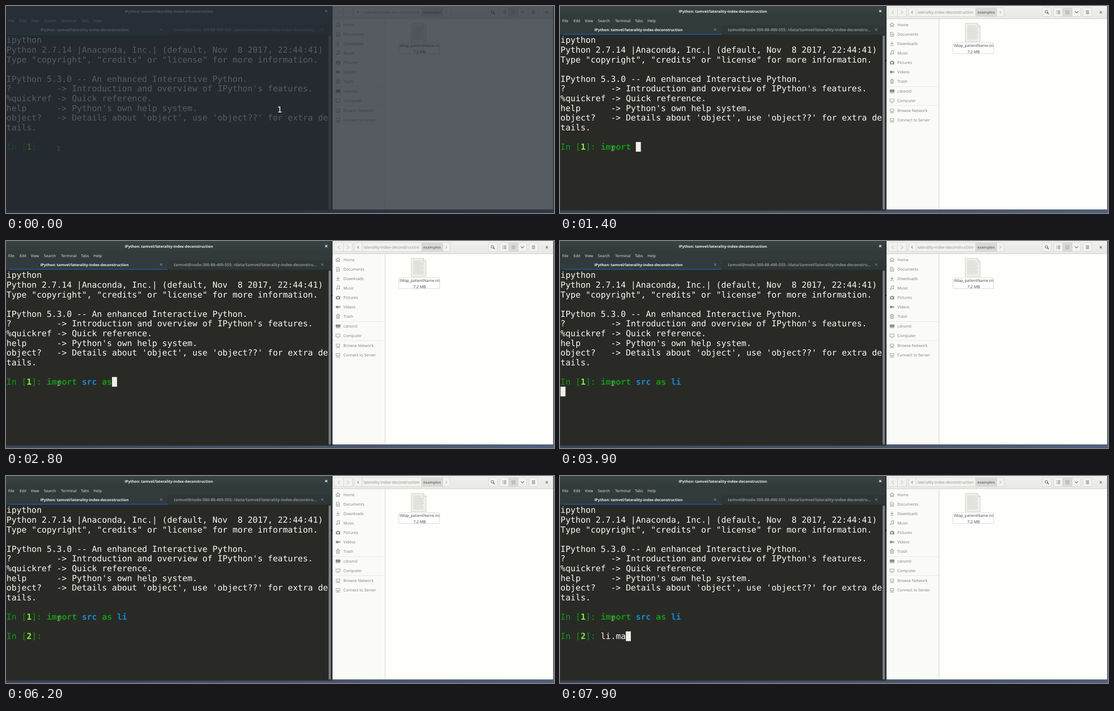
These frames come from a looping animation (1215x461 px, 8 s). An HTML page:

```html
<!DOCTYPE html>
<html lang="en">
<head>
<meta charset="utf-8">
<title>IPython session</title>
<style>
  html, body { margin: 0; width: 100%; height: 100%; overflow: hidden; background: #3d4858; }
  svg { display: block; width: 1215px; height: 461px; }
  text { white-space: pre; text-rendering: geometricPrecision; }
  .ui { font: 8.7px "Open Sans", sans-serif; fill: #7b7d79; }
  .menu { font-size: 8.5px; fill: #e4e6e2; }
  .bold { font-weight: 700; font-size: 8.2px; }
  .mid { text-anchor: middle; }
  .pale { fill: #f1f2ee; }
  .dark { fill: #3c4144; }
  .term { font: 18.5px "DejaVu Sans Mono", monospace; fill: #f8f8f2; }
  .green { fill: #149714; }
  .kw { fill: #149714; font-weight: 700; }
  .num { fill: #83f13c; font-weight: 700; }
  .mod { fill: #1785d0; font-weight: 700; }
  .icon { fill: none; stroke: #989a95; stroke-width: 1.1; }
  .solid { fill: #8d8f8a; stroke: none; }
  .btn { fill: #f2f2ef; stroke: #d6d6d1; }
</style>
</head>
<body>
<svg viewBox="0 0 1215 461" xmlns="http://www.w3.org/2000/svg">
  <defs>
    <linearGradient id="desk">
      <stop stop-color="#3b4554"/><stop offset="1" stop-color="#52607a"/>
    </linearGradient>
    <linearGradient id="bar" x2="0" y2="1">
      <stop stop-color="#394344"/><stop offset="1" stop-color="#323b3b"/>
    </linearGradient>
    <linearGradient id="head" x2="0" y2="1">
      <stop stop-color="#f0f0ed"/><stop offset="1" stop-color="#e8e8e4"/>
    </linearGradient>
  </defs>
  <rect width="1215" height="461" fill="url(#desk)"/>

  <!-- terminal window -->
  <rect width="722" height="456" fill="#2b3233"/>
  <rect width="721" height="23" fill="url(#bar)"/>
  <rect y="23" width="721" height="42" fill="#323b3b"/>
  <rect x="358" y="43" width="363" height="21" fill="#2e3637"/>
  <rect y="64" width="721" height="1" fill="#252b2b"/>
  <rect x="7" y="62" width="351" height="2" fill="#1e569a"/>
  <rect x="1" y="65" width="714" height="389" fill="#292a26"/>
  <rect x="715" y="65" width="6" height="389" fill="#363e3e"/>
  <rect x="715.5" y="66" width="4.5" height="387" rx="2" fill="#7b8281"/>
  <g class="ui">
    <text class="bold mid pale" x="361" y="14.5">IPython: tamvel/laterality-index-deconstruction</text>
    <text class="bold mid pale" x="174" y="55.5">IPython: tamvel/laterality-index-deconstruction</text>
    <text class="bold" x="372" y="55.5" style="font-size:8.85px;fill:#8b918f">tamvel@node-300-88-400-555: /data/tamvel/laterality-index-deconstru…</text>
    <g id="menu"></g>
  </g>
  <path d="M707.7 9l4.6 4.6m0-4.6l-4.6 4.6" stroke="#eee" stroke-width="1.5"/>
  <path d="M341.5 50l5 5m0-5l-5 5M698.5 50l5 5m0-5l-5 5" stroke="#9aa09e"/>
  <g class="term" id="banner"></g>
  <g class="term">
    <text id="first"></text>
    <text id="second"></text>
  </g>
  <rect id="cursor" width="11.14" height="21.6" fill="#f0f0eb"/>
  <g fill="none">
    <path d="M114 313h2l1 1 1-1h2M117 314v7M114 322h2l1-1 1 1h2" stroke="#20211e" stroke-width="2.4"/>
    <path d="M114 313h2l1 1 1-1h2M117 314v7M114 322h2l1-1 1 1h2" stroke="#d4d5d0"/>
  </g>

  <!-- file manager -->
  <rect x="721.5" width="2.5" height="456" fill="#2c3540"/>
  <circle cx="722.5" cy="121.5" r="2" fill="#15181c"/>
  <rect x="724" width="489" height="453" fill="#fefefa"/>
  <rect x="724" width="489" height="28" fill="url(#head)"/>
  <rect x="724" y="28" width="116" height="425" fill="#fafaf6"/>
  <path d="M724 28.5h489M840.5 28v425" stroke="#cfcfca"/>
  <path d="M724 179.5h116M724 221.5h116" stroke="#e6e6e2"/>
  <g class="btn">
    <rect x="727.5" y="3.5" width="41" height="20" rx="2.5"/>
    <rect x="772.5" y="3.5" width="212" height="20" rx="2.5"/>
    <rect x="1069.5" y="3.5" width="20" height="20" rx="2.5"/>
    <rect x="1094.5" y="3.5" width="60" height="20" rx="2.5"/>
    <rect x="1159.5" y="3.5" width="20" height="20" rx="2.5"/>
  </g>
  <path d="M922 4h46v19h-46zM1115 4h20v19h-20z" fill="#d9d9d5"/>
  <path d="M748.5 4v19M789.5 4v19M921.5 4v19M968.5 4v19M1114.5 4v19M1135.5 4v19" stroke="#d3d3ce"/>
  <g fill="none" stroke="#6c6e6a" stroke-width="1.2">
    <path d="M740 10l-4 4 4 4M756 10l4 4-4 4" stroke="#c2c3be"/>
    <path d="M782 11.5l-2.5 2.5 2.5 2.5" stroke="#777974"/>
    <path d="M975 11.5l2.5 2.5-2.5 2.5" stroke="#b4b5b0"/>
    <circle cx="1078.5" cy="12.8" r="2.8"/>
    <path d="M1080.5 15l3 3" stroke-width="1.8"/>
    <path d="M1101 10.8h1.5m1.5 0h5M1101 13.8h1.5m1.5 0h5M1101 16.8h1.5m1.5 0h5"/>
    <path d="M1121.5 10.8h7.5M1121.5 13.8h7.5M1121.5 16.8h7.5" stroke-dasharray="1.5"/>
    <path d="M1141.5 12l3.5 3.5 3.5-3.5M1166 10.8h7M1166 13.8h7M1166 16.8h7"/>
    <path d="M1196.5 11.5l5 5m0-5l-5 5"/>
  </g>
  <g class="ui">
    <text x="793" y="17" style="fill:#8b8d88">laterality-index-deconstruction</text>
    <text class="bold" x="925" y="17">examples</text>
    <g id="places"></g>
  </g>
  <g class="icon">
    <path d="M731 42l5-4.5 5 4.5M732.5 41.5v4.5h2.5v-3h2v3h2.5v-4.5"/>
    <path d="M732.5 58.5h4.5l2.5 2.5v6.5h-7zM734 62.5h4M734 65h4"/>
    <path d="M736 79v6m-3-2.5l3 3 3-3M732 88h8"/>
    <path d="M734.5 107v-6.5l5-1v6.5"/>
    <circle cx="733.3" cy="107.3" r="1"/><circle cx="738.3" cy="106.3" r="1"/>
    <path d="M731.5 123.5h2.5l1-1.5h3l1 1.5h2v6.5h-9.5z" class="solid"/>
    <circle cx="736" cy="126.5" r="2" fill="#fafaf6" stroke="none"/>
    <path d="M731.5 144.5h6v5h-6zM737.5 147l3.500-2.500v5z" class="solid"/>
    <path d="M731.5 165h9M734.5 164.5v-1.500h3v1.500M733 165.500v7h6v-7M735 167v4M737 167v4"/>
    <rect class="solid" x="731" y="186" width="10.5" height="6" rx="1"/>
    <path d="M731 193.500h10.500"/>
    <path d="M731.500 207h9v6h-9zM733.500 215.500h5"/>
    <path d="M732 229.500h8v5h-8zM736 234.500v2.500M731 237.500h10"/>
    <path d="M732 250.500h8v5h-8zM736 255.500v2.500M731 258.500h10"/>
  </g>

  <!-- document -->
  <path d="M898.5 38.5h26l7 7v34h-33z" fill="#eeeeea" stroke="#cfcfca"/>
  <path d="M924.5 38.5l7 7q-4-1.500-6 .5 1-4-1-7.500z" fill="#fff" stroke="#b5b6b0" stroke-width=".8"/>
  <path id="print" fill="none" stroke="#c9cac4" stroke-width=".8"/>
  <rect x="871" y="82" width="90.5" height="24" rx="2" fill="#fff" stroke="#d3d3ce"/>
  <g class="ui">
    <text class="mid dark" x="917" y="91" style="font-size:8.5px">tMap_patientName.nii</text>
    <text class="mid dark" x="917" y="105">7.2 MB</text>
  </g>

  <g id="countdown">
    <rect width="1215" height="461" fill="#242a33" fill-opacity=".765"/>
    <text class="mid" x="607" y="237" style="font:18px 'DejaVu Sans',sans-serif;fill:#fff">1</text>
  </g>
</svg>
<script>
const LOOP = 8000, CELL = 11.14, ROW = 21.6, LEFT = 1.1, TOP = 65.25, ASCENT = 17.2;
const $ = id => document.getElementById(id);
const span = (cls, s) => `<tspan class="${cls}">${s}</tspan>`;

function place(el, col, row, rise = 0) {
  el.setAttribute("x", LEFT + col * CELL);
  el.setAttribute("y", TOP + row * ROW + rise);
}

const banner = `ipython
Python 2.7.14 |Anaconda, Inc.| (default, Nov  8 2017, 22:44:41)
Type "copyright", "credits" or "license" for more information.

IPython 5.3.0 -- An enhanced Interactive Python.
?         -> Introduction and overview of IPython's features.
%quickref -> Quick reference.
help      -> Python's own help system.
object?   -> Details about 'object', use 'object??' for extra de
tails.`;
$("banner").innerHTML = banner.split("\n").map(s =>
  `<text>${s.replace(/>/g, "&gt;")}</text>`).join("");
[...$("banner").children].forEach((el, row) => place(el, 0, row, ASCENT));
place($("first"), 0, 11, ASCENT);
place($("second"), 0, 13, ASCENT);

const menu = { File: 5, Edit: 30, View: 55, Search: 84, Terminal: 122, Tabs: 166, Help: 194 };
$("menu").innerHTML = Object.entries(menu).map(([s, x]) =>
  `<text class="menu" x="${x}" y="35.5">${s}</text>`).join("");

const places = { Home: 42, Documents: 63, Downloads: 84, Music: 105, Pictures: 126, Videos: 147,
  Trash: 168, cdrom0: 190, Computer: 211, "Browse Network": 233, "Connect to Server": 254 };
$("places").innerHTML = Object.entries(places).map(([s, y]) =>
  `<text x="748" y="${y + 3}">${s}</text>`).join("");

$("print").setAttribute("d", Array.from({ length: 13 }, (_, i) =>
  `M903 ${44.5 + i * 2.4}h${i < 2 ? 18 : 21 + (i * 5) % 4}`).join(""));

// [time, first input, second input (null: no prompt yet), cursor row (0: hidden)]
const line = "import src as li";
const typed = (t, n) => [t, line.slice(0, n), null, 11];
const steps = [
  [0, "", null, 0], typed(400, 0), typed(700, 2), typed(900, 3),
  typed(1100, 4), typed(1200, 5), typed(1300, 6), typed(1400, 7),
  typed(2000, 8), typed(2200, 9), typed(2300, 10), typed(2600, 12),
  typed(2800, 13), typed(3500, 14), typed(3700, 16),
  [3900, line, null, 12], [5000, line, null, 0], [5100, line, null, 12], [5700, line, null, 0],
  [6200, line, "", 0], [6300, line, "", 13], [6600, line, "l", 13], [6800, line, "li", 13],
  [7400, line, "li", 0], [7800, line, "li.", 13], [7900, line, "li.ma", 13]
];

const prompt = n => span("green", "In [") + span("num", n) + span("green", "]: ");

function highlight(code) {
  const partialAlias = /src a$/.test(code);
  return code.replace(/\w+/g, (word, at) => {
    if (word === "import" || word === "as") return span("kw", word);
    const isModule = code.startsWith("import ") && !(partialAlias && at > 7);
    return isModule ? span("mod", word) : word;
  });
}

let shown;
function draw() {
  const t = performance.now() % LOOP;
  const step = steps.findLast(s => s[0] <= t);
  if (step !== shown) {
    shown = step;
    const [time, first, second, row] = step;
    $("first").innerHTML = prompt(1) + highlight(first);
    $("second").innerHTML = second === null ? "" : prompt(2) + second;
    const col = row === 11 ? 8 + first.length : row === 13 ? 8 + second.length : 0;
    place($("cursor"), col, row);
    $("cursor").style.display = row ? "" : "none";
    $("countdown").style.display = time < 400 ? "" : "none";
  }
  requestAnimationFrame(draw);
}
draw();
</script>
</body>
</html>
```
